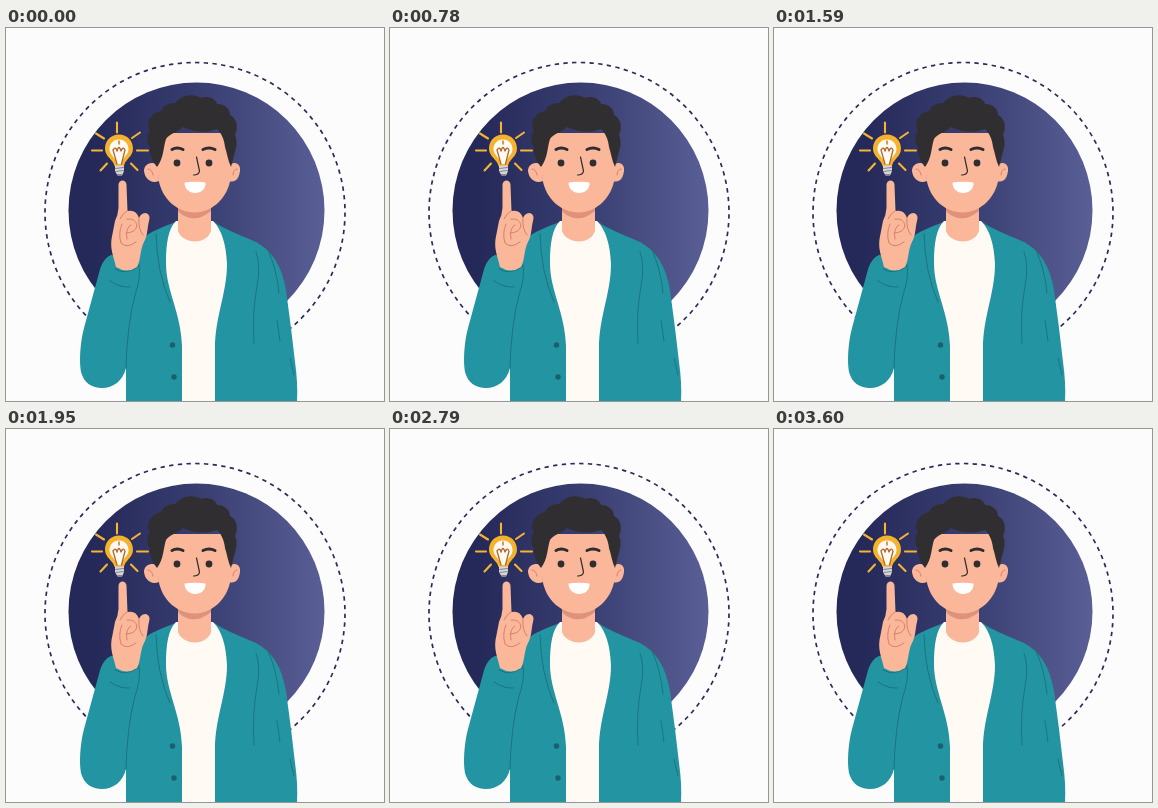
An HTML page that plays this animation: 378 px wide and 373 px high, repeating every 3630 ms.

```html
<!DOCTYPE html>
<html lang="en">
<head>
<meta charset="utf-8">
<title>Bright idea</title>
<style>
  html, body { margin: 0; width: 100%; height: 100%; overflow: hidden; background: #fcfcfc; }
  svg { display: block; width: 378px; height: 373px; }
  .line { fill: none; stroke-linecap: round; stroke-linejoin: round; }
  .skin { fill: #fbb799; }
  .crease { stroke: #d6816a; stroke-width: 1; }
  .seam { stroke: #1b7482; stroke-width: 1; }
  .dark { stroke: #2f2d30; }
  .ray { stroke: #f6b334; stroke-width: 2.1; }
</style>
</head>
<body>
<svg viewBox="0 0 378 373">
  <defs>
    <linearGradient id="night">
      <stop offset=".1" stop-color="#252959"/>
      <stop offset=".5" stop-color="#383d70"/>
      <stop offset="1" stop-color="#595e95"/>
    </linearGradient>
  </defs>

  <circle id="ring" cx="189" cy="184.5" r="150" pathLength="108" class="line"
    style="stroke-linecap:butt" stroke="#292c5c" stroke-width="1.7" stroke-dasharray=".5 .5"/>
  <circle cx="190.5" cy="182.5" r="128" fill="url(#night)"/>

  <g id="bulb">
    <path class="line ray" d="M111 94.500V104.500M90 105.500L98 110.500M86 122.500H96M94.500 142.500L101 135.500M126 110L134 104.500M131 122.500H142M125 135.500L131.500 142"/>
    <path fill="#f5b22c" d="M113 106.500C104.500 106.500 99 113 99 120.500C99 129 107 131 108.500 138H118C119 131 127 129 127 120.500C127 113 121.500 106.500 113 106.500Z"/>
    <path fill="#fffaf0" d="M113 111.500C107 111.500 103.500 116 103.500 121C103.500 127 109.500 129 111 136H115.500C116.500 129 122.500 127 122.500 121C122.500 116 119 111.500 113 111.500Z"/>
    <path class="line" stroke="#b5632f" stroke-width="1.300" d="M111 136L107 122Q110 118 111 123Q113 116 115 123Q117 118 119 122L115.500 136M113 113V116"/>
    <path fill="#d5d5da" d="M109 137.500H118V143L116 147.500H111.500L109 143Z"/>
    <path class="line" stroke="#85858f" stroke-width="1" d="M109.500 140.500L117.500 139.500M109.500 143.500L117.500 142.500M111.500 146.500H116"/>
  </g>

  <g id="cardigan">
    <path fill="#2394a1" d="M171 193C160 199 143 202 135 213L128 229L105 227C98 230 95 237 93 245L78 300C74 315 73 334 75 344C78 355 86 360 96 360C107 360 117 353 120 340V373H291Q292 355 289 334L285 300L280 262C276 239 267 223 250 214C235 207 217 201 207 193Z"/>
    <path fill="#fffaf4" d="M170 193C162 201 160 216 160 235C160 263 175 284 176 318V373H209V320C209 289 221 265 221 236C220 216 216 202 207 193Z"/>
    <path class="line seam" d="M133 236Q135 251 129 267Q121 298 120 340M109 241Q120 248 133 238M104 253Q114 260 124 259M150 206Q151 245 164 274M250 224Q255 237 251 258Q246 285 248 316M262 222Q271 242 273 265M271 292L274 313M284 330L288 347"/>
    <g fill="#1d5e6c"><circle cx="166.500" cy="317" r="2.700"/><circle cx="168" cy="349" r="2.700"/></g>
  </g>

  <g id="hand">
    <path class="skin" d="M112.500 157C112.500 151 120.500 151 120.500 157L121.500 183Q130 181 133 190Q135 185 140 185Q145 187 143 193C141 201 142 206 138 214C134 221 135 232 131 239Q121 246 110 239C108 229 104 222 105.500 211L109 193Q112 187 112.500 180Z"/>
    <path class="line crease" d="M121 183Q116 186 114 191M121 191Q130 190 131 198Q129 205 120 205M116 196Q112 205 115 215Q121 221 130 214M125 197Q119 200 121 211M133 190Q132 201 137 207"/>
  </g>

  <g id="head">
    <path class="skin" d="M172 174V203C174 209 181 213.500 189 213.500C197 213.500 203 209 205 203V174Z"/>
    <path fill="#df917b" d="M172 178Q188 190 205 178V183Q194 192 184 190Q176 188 172 183Z"/>
    <path class="skin" d="M152 137C144 132 138 137 138 143C139 151 145 156 153 153ZM224 137C230 132 235 137 234 143C233 151 229 155 223 153Z"/>
    <path class="skin" d="M152 105H224L225 146C224 168 207 184.500 189 184.500C169 184.500 153 168 152 146Z"/>
    <path fill="#302e31" d="M151 139C146 132 143 126 144 119C140 114 141 107 144 103C139 95 145 85 155 83C158 76 165 75 169 75C176 67 187 65 195 70C202 67 210 71 211 76C220 76 224 82 224 87C232 91 232 101 229 107C232 114 230 121 228 127L225 139C222 133 221 125 219 119C218 110 215 105 211 101C197 106 185 103 177 99C172 104 163 106 160 111C157 120 158 130 151 139Z"/>
    <path class="line dark" stroke-width="3" d="M166 121.500Q171 118.500 177 121.500M197 121.500Q203 118.500 209 121.500"/>
    <g fill="#302e31"><circle cx="171" cy="135" r="3.400"/><circle cx="203" cy="135" r="3.400"/></g>
    <path class="line dark" stroke-width="1.200" d="M190.500 129L193.500 143Q193 147 187.500 147"/>
    <path fill="#fff" d="M178.500 154.500Q189 153 199.500 154.500C200 161 195 165 189 165C183 165 178.500 160.500 178.500 154.500Z"/>
    <path class="line crease" d="M142 141Q146 141 147 147M231 141Q227 142 227 147"/>
  </g>
</svg>
<script>
  const LOOP = 3630, STEP = 30;
  const ring = document.getElementById("ring");

  function draw(now) {
    const time = Math.floor(now % LOOP / STEP) * STEP;
    ring.setAttribute("transform", `rotate(${360 * time / LOOP} 189 184.5)`);
    requestAnimationFrame(draw);
  }
  draw(0);
</script>
</body>
</html>
```
